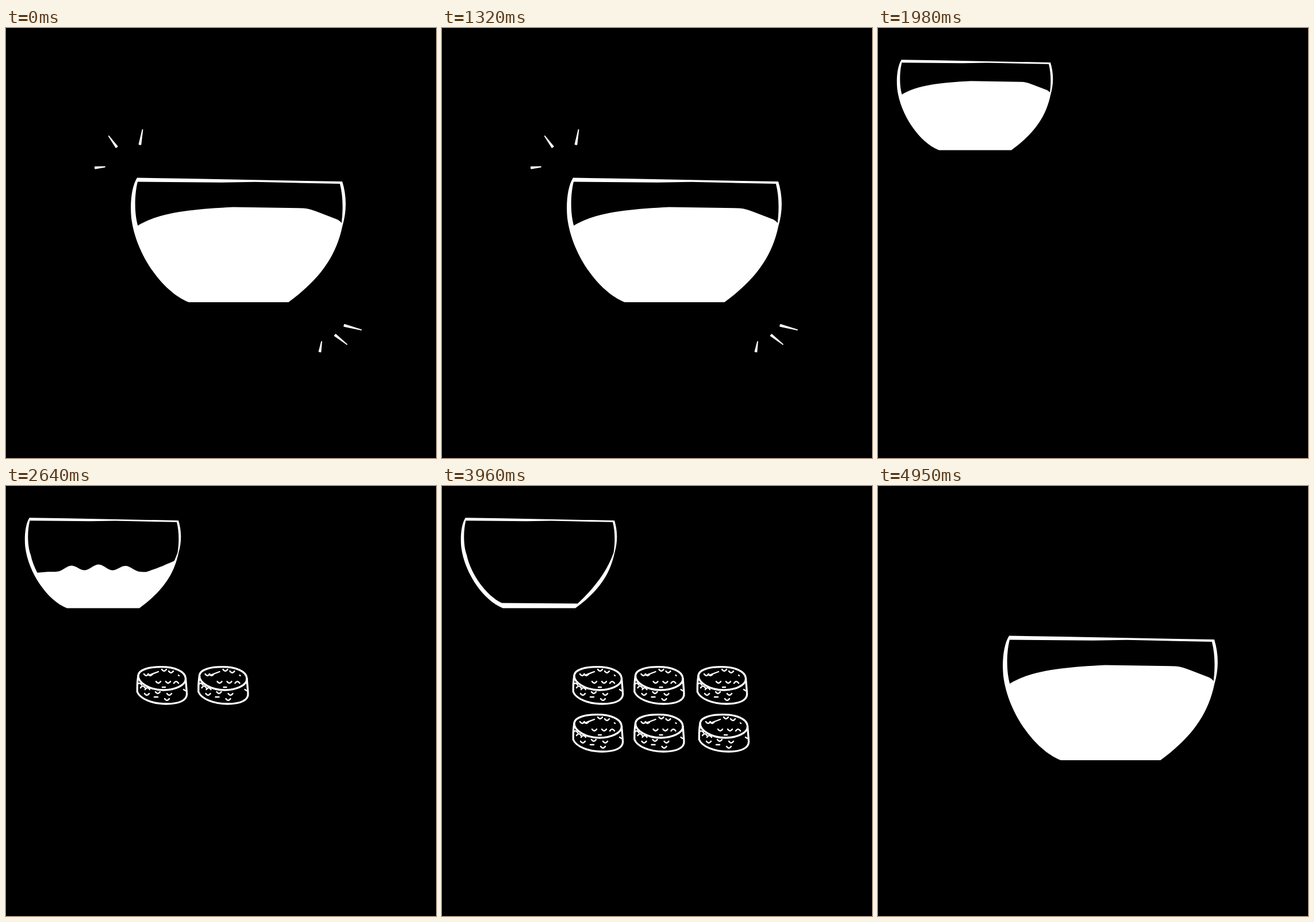
These frames come from a looping animation (748x748 px, 5280 ms). An HTML page:

```html
<!DOCTYPE html>
<html lang="en">
<head>
<meta charset="utf-8">
<title>Bowl and tablets</title>
<style>
  html, body { margin: 0; width: 100%; height: 100%; overflow: hidden; background: #000; }
  svg { display: block; width: 100%; height: 100%; }
  #tablet { fill: none; stroke: #fff; stroke-width: 3.3; stroke-linecap: round; stroke-linejoin: round; }
  #pores { stroke-width: 2.4; }
  #rays { fill: #fff; stroke: #fff; stroke-width: 1.8; stroke-linejoin: round; }
</style>
</head>
<body>
<svg viewBox="0 0 748 748">
  <defs>
    <clipPath id="air"><path id="airShape"/></clipPath>
    <g id="tablet">
      <path d="M3 16C5 6 22 1.7 43 1.7C66 1.7 85 9 85.5 22C86 34 66 42 47 42C24 42 2 30 3 16"/>
      <path d="M3 17C1 28 1.3 36 1.3 45C6 57 27 66 52 66C74 66 89 60 87.5 47L85.5 22"/>
      <path id="pores"/>
    </g>
  </defs>
  <rect width="748" height="748"/>
  <g id="bowl">
    <path fill="#fff" d="M40.7 55.2L106 56.3L300 60C305.5 78 306 97 300 117C292 155 271 184 232 212.5H106C72 199 39 151 33.4 106C31.5 86 34 66 40.7 55.2Z"/>
    <path clip-path="url(#air)" d="M41.4 60.3L147 61.2L190 60.5L297 62.8C301.5 80 301 100 298.5 116C286 151 264 178 236 204.5L104 203.5C76 190 50 153 43 120C37 104 37 78 41.4 60.3Z"/>
  </g>
  <g id="tablets"></g>
  <path id="rays"/>
</svg>
<script>
const $ = id => document.getElementById(id);
const draw = (id, d) => $(id).setAttribute("d", d);

// Pores are one small arc, cupped or humped
const cups = [[13, 14], [20, 14], [44, 6], [56, 9], [34, 27], [51, 27], [14, 48], [49, 57], [33, 45], [53, 48]];
const humps = [[65, 30], [1, 33], [7, 38], [15, 41]];
const arcs = (points, depth) => points.map(p => `M${p}q4 ${depth} 8 0`).join("");
draw("pores", arcs(cups, 6) + arcs(humps, -6) + "M22 16l16-6M45 37h5M73 16l1 1M31 54h6M82 41l3 2");

const rows = [[227, 333.5, 443], [227, 333.5, 446]];
$("tablets").innerHTML = rows.map((row, r) =>
  row.map(x => `<use href="#tablet" x="${x}" y="${313 + 83 * r}"/>`).join("")).join("");

const full = "M28 122L41 116C68 99 110 95 162 92.3L251 93.7Q260 94.5 269 98.5L294 108Q299 111 300 114L308 118V40H28Z";

// Ripples fade toward the walls; the liquid clings to the right side
function ripple(x) {
  const fade = Math.exp(-(((x - 160) / 75) ** 4));
  const cling = 23 * Math.max(0, (x - 245) / 53);
  return 151 - fade * (9.5 + 5 * Math.cos((x - 112) * 2 * Math.PI / 49)) - cling;
}

function airAbove(taken) {
  if (!taken) return full;
  let d = "M28 40";
  for (let x = 28; x <= 310; x += 3) d += `L${x} ${ripple(x) + 19 * (taken - 2)}`;
  return d + "V40Z";
}

const rays = [
  { inner: [172, 241.5], outer: [155, 243.2], axis: "wide", fatOuter: true },
  { inner: [192.5, 207], outer: [178.8, 188] },
  { inner: [233, 202.5], outer: [237.5, 177], axis: "tall" },
  { inner: [588.5, 517.3], outer: [618, 525.2], axis: "wide" },
  { inner: [572.5, 534.2], outer: [593, 550.3] },
  { inner: [549, 545.5], outer: [546, 563], axis: "tall", fatOuter: true }
];

function rayPath({ inner, outer, axis, fatOuter }, stretched) {
  const length = Math.hypot(outer[0] - inner[0], outer[1] - inner[1]);
  const [ux, uy] = outer.map((v, i) => (v - inner[i]) / length);
  const reach = length + (axis && axis === stretched ? 31 : 0);
  const tip = [inner[0] + ux * reach, inner[1] + uy * reach];
  const [fat, thin] = fatOuter ? [tip, inner] : [inner, tip];
  const side = w => [fat[0] - uy * w, fat[1] + ux * w];
  return `M${thin}L${side(1.5)}L${side(-1.5)}Z`;
}

const sizes = {
  small: "",
  medium: "translate(63.2 74.7) scale(1.211)",
  large: "translate(172 184.5) scale(1.3766)"
};
const STEP = 330;
const steps = [
  ...["none", "tall", "none", "wide", "none"].map(stretched => ({ size: "large", stretched })),
  { size: "medium" },
  ...[0, 1, 2, 3, 4, 5, 6, 0].map(count => ({ size: "small", count })),
  { size: "medium" },
  { size: "large" }
];

function show({ size, stretched, count = 0 }) {
  $("bowl").setAttribute("transform", sizes[size]);
  draw("airShape", airAbove(count));
  draw("rays", stretched ? rays.map(ray => rayPath(ray, stretched)).join("") : "");
  [...$("tablets").children].forEach((tablet, i) => tablet.style.display = i < count ? "" : "none");
}

const start = performance.now();
let shown = -1;
function tick() {
  const index = Math.floor((performance.now() - start) / STEP) % steps.length;
  if (index !== shown) show(steps[shown = index]);
  requestAnimationFrame(tick);
}
tick();
</script>
</body>
</html>
```
